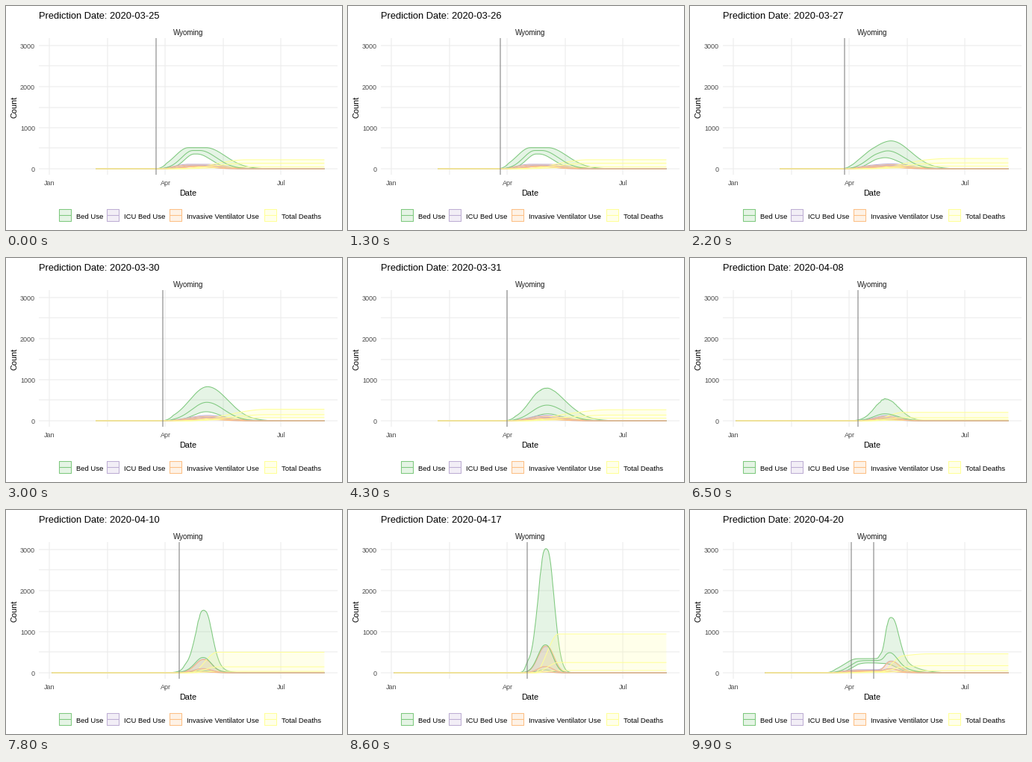
A matplotlib script that plays this animation: 450x300 px, repeating every 10 s.

```python
import numpy as np
import matplotlib.pyplot as plt
from matplotlib.animation import FuncAnimation
from matplotlib.patches import Rectangle

plt.rcParams["font.family"] = "Liberation Sans"
W, H, DPI = 450, 300, 100
PX = 72 / DPI                       # points per pixel
LEFT, RIGHT, TOP, BOTTOM = 44, 444, 43, 226
BASE, PER_COUNT = 218, 0.055
JAN_1, PER_DAY = 58, 1.7055
GRID, MARK = "#EBEBEB", "#7F7F7F"
COLORS = ["#7FC97F", "#BEAED4", "#FDC086", "#FFFF99"]
LABELS = ["Bed Use", "ICU Bed Use", "Invasive Ventilator Use", "Total Deaths"]

DAYS = [84, 85, 86, 88, 89, 90, 91, 95, 97, 98, 100, 103, 107, 110]
ENDS = [6, 15, *range(23, 101, 7)]  # frame at which each change is complete

# Curve samples: the late forecasts reach further back than the early ones.
LATE_X = np.linspace(61.4, 426.4, 260)
EARLY_X = np.interp(LATE_X, [61.4, 185, 256, 266, 300, 426.4],
                    [120, 245, 266, 272, 305, 426.4])


def to_x(day):
    return JAN_1 + PER_DAY * day


def to_y(count):
    return BASE - PER_COUNT * count


def mix(a, b, t):
    return a + (b - a) * t


def hump(x, mid, rise, fall, flat=0.0):
    """Bell of height 1 with separate flank widths and an optional flat top."""
    left = np.maximum(mid - flat - x, 0) / rise
    right = np.maximum(x - mid - flat, 0) / fall
    return np.exp(-0.5 * (left + right) ** 2)


def ramp(x, lo, hi):
    t = np.clip((x - lo) / (hi - lo), 0, 1)
    return t * t * (3 - 2 * t)


def forecast(x, beds, icu, deaths, shape, growth, flat=0, narrow=1.0,
             vent=0.8, onset=210, jitter=0.0, shoulder=0):
    """Upper, mean and lower curve for each of the four groups."""
    mid, rise, fall = shape
    fade = np.clip((x - onset) / 14, 0, 1) * np.clip((385 - x) / 40, 0, 1)
    noise = 1 + np.random.default_rng(4).normal(0, jitter, len(x))
    groups = np.zeros((4, 3, len(x)))
    for band in range(3):
        k = narrow ** band
        bell = fade * hump(x, mid - band, rise * k, fall * k, flat * 0.4 ** band)
        groups[0, band] = beds[band] * bell
        groups[1, band] = icu[band] * bell
        groups[2, band] = icu[band] * vent * bell
        groups[3, band] = deaths[band] * ramp(x, *growth)
    groups[0, 0] = groups[0, 0] * noise + shoulder * hump(x, 240, 2.5, 4)
    return groups


A = forecast(EARLY_X, (515, 445, 360), (110, 85, 60), (220, 135, 45),
             (256, 18, 26), (232, 322), flat=11.5, narrow=0.85, onset=201)
C = forecast(EARLY_X, (830, 450, 220), (130, 85, 40), (280, 150, 75),
             (270, 24, 27), (240, 350), narrow=0.84)
F = forecast(EARLY_X, (775, 255, 60), (150, 85, 30), (245, 115, 25),
             (258, 13.5, 18), (235, 286), flat=2.5, jitter=0.014)
G = forecast(LATE_X, (530, 170, 40), (125, 75, 25), (205, 75, 20),
             (262, 14.5, 17.5), (240, 286), jitter=0.014)
J = forecast(LATE_X, (3020, 680, 70), (640, 150, 20), (945, 250, 55),
             (265.5, 9.8, 9.2), (250, 282), flat=1.2, vent=1.02, jitter=0.006,
             shoulder=120)
CURVES = [A, A, A, mix(A, C, 0.7), C, mix(C, F, 0.1), mix(C, F, 0.4), F, F,
          G, mix(G, J, 0.2), mix(G, J, 0.5), J, J]
XS = [EARLY_X] * 9 + [LATE_X] * 5

fig = plt.figure(figsize=(W / DPI, H / DPI), dpi=DPI, facecolor="white")
ax = fig.add_axes([0, 0, 1, 1])
ax.set_xlim(0, W)
ax.set_ylim(H, 0)
ax.axis("off")


def line(xs, ys, color, z=1):
    return ax.plot(xs, ys, color=color, lw=1.05 * PX, zorder=z, snap=False,
                   solid_capstyle="butt", solid_joinstyle="round")[0]


def label(x, y, s, size, color="black", ha="left", va="baseline", **kw):
    return ax.text(x, y, s, fontsize=size * PX, color=color, ha=ha, va=va, **kw)


# Grid and axes
for gx in (58, 136, 213, 291, 368):
    line([gx, gx], [TOP, BOTTOM], GRID)
for count in range(0, 3001, 500):
    gy = round(to_y(count))
    line([LEFT, RIGHT], [gy, gy], GRID)
    if count % 1000 == 0:
        label(39, gy + 4, str(count), 9, "#4D4D4D", "right")
for gx, name in ((58, "Jan"), (213.5, "Apr"), (368.5, "Jul")):
    label(gx, 240.5, name, 9, "#4D4D4D", "center")
label(244, 39, "Wyoming", 9.8, "#1A1A1A", "center")
label(244, 254, "Date", 10.9, ha="center")
label(11.5, 135.5, "Count", 11, ha="center", va="center", rotation=90)
title = label(44, 17, "", 12.85)

# Legend
KEY, KEY_Y = 16, 272.5
for kx, name, color in zip((71.5, 135.5, 219.5, 346.5), LABELS, COLORS):
    right, low, mid = kx + KEY, KEY_Y + KEY, KEY_Y + KEY / 2
    ax.add_patch(Rectangle((kx, KEY_Y), KEY, KEY, fc=color, alpha=0.2, lw=0))
    line([kx, right, right, kx, kx], [KEY_Y, KEY_Y, low, low, KEY_Y], color)
    line([kx, right], [mid, mid], color)
    label(kx + 22.5, 285, name, 9.5)

# Moving parts
fills, uppers, lowers, means = [], [], [], []
for k, color in enumerate(COLORS):
    fills.append(ax.fill([0], [0], fc=color, alpha=0.2, lw=0, zorder=3 + k)[0])
    uppers.append(line([], [], color, 3.5 + k))
    lowers.append(line([], [], color, 3.5 + k))
    means.append(line([], [], color, 8 + k))
marker = line([], [], MARK, 13)
ghost = line([], [], MARK, 13)


def phase(frame):
    """Current state, next state and progress between them."""
    k = sum(frame >= end for end in ENDS)
    steps = 4 if k == 2 else 3
    t = max(0, frame - ENDS[k] + steps) / steps
    return k, (k + 1) % len(DAYS), t


def date_text(day):
    month, first = (4, 91) if day >= 91 else (3, 60)
    return f"Prediction Date: 2020-{month:02d}-{day - first + 1:02d}"


def place(artist, day):
    x = round(to_x(day))
    artist.set_data([x, x], [TOP, BOTTOM])


def draw(frame):
    k, n, t = phase(frame)
    title.set_text(date_text(DAYS[k]))
    x = mix(XS[k], XS[n], t)
    y = to_y(mix(CURVES[k], CURVES[n], t))
    for g, (up, mid, low) in enumerate(y):
        fills[g].set_xy(np.column_stack([np.r_[x, x[::-1]], np.r_[up, low[::-1]]]))
        uppers[g].set_data(x, up)
        lowers[g].set_data(x, low)
        means[g].set_data(x, mid)
    place(marker, mix(DAYS[k], DAYS[n], t))
    place(ghost, DAYS[-1])
    ghost.set_visible(n == 0 and t > 0)
    return [title, marker, ghost, *fills, *uppers, *lowers, *means]


anim = FuncAnimation(fig, draw, frames=100, interval=100, repeat=True,
                     repeat_delay=0, blit=False)
plt.show()
```
